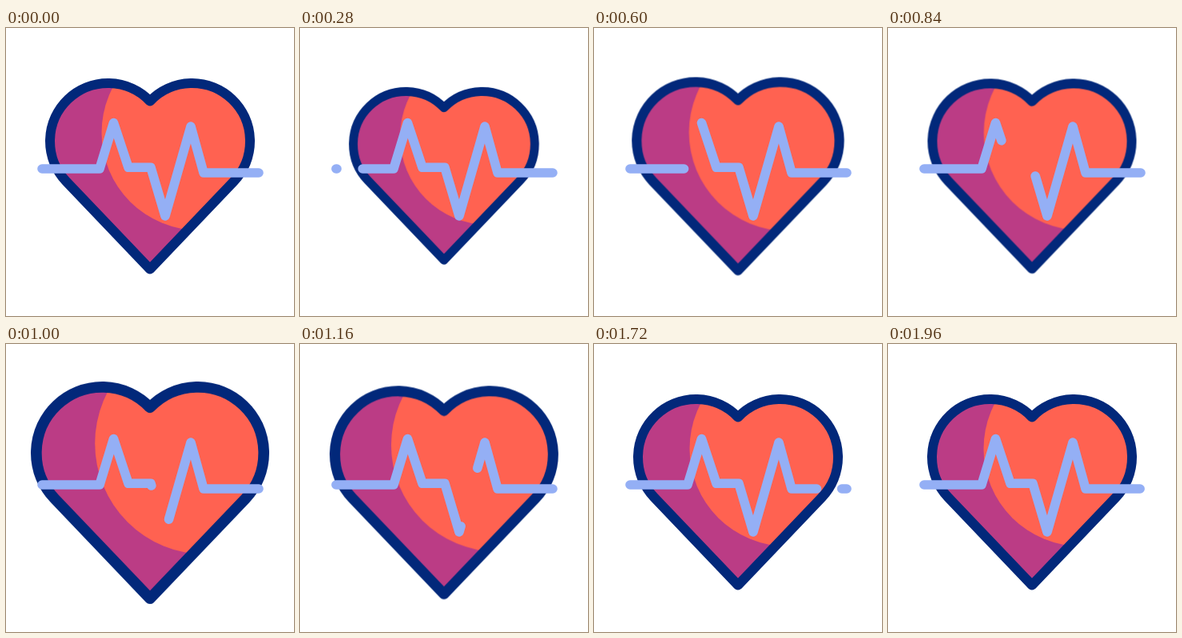
An HTML page that plays this animation: 360 by 360 pixels, repeating every 2 s.

```html
<!DOCTYPE html>
<html lang="en">
<head>
<meta charset="utf-8">
<title>Heartbeat</title>
<style>
  html, body { margin: 0; width: 100%; height: 100%; overflow: hidden; background: #fff; }
  svg { display: block; width: 100vw; height: 100vh; }
  #heart { transform-origin: 180px 180px; }
  .outline { fill: none; stroke: #02287a; stroke-width: 12; stroke-linejoin: round; }
  .pulse {
    fill: none; stroke: #94aff5; stroke-width: 11.6;
    stroke-linecap: round; stroke-linejoin: round; stroke-dasharray: 1 2;
  }
</style>
</head>
<body>
<svg viewBox="0 0 360 360">
  <defs>
    <path id="shape" d="M180 91.5A72.5 72.5 0 0 0 75 191.5L180 301.5L285 191.5A72.5 72.5 0 0 0 180 91.5Z"/>
    <clipPath id="inside"><use href="#shape"/></clipPath>
  </defs>
  <g id="heart">
    <use href="#shape" fill="#bb3c85"/>
    <g clip-path="url(#inside)"><circle cx="241.4" cy="131" r="121.9" fill="#ff6251"/></g>
    <use href="#shape" class="outline"/>
  </g>
  <path id="drawn" class="pulse" pathLength="1"/>
  <path id="erased" class="pulse" pathLength="1"/>
</svg>
<script>
  const byId = id => document.getElementById(id);
  const loop = { duration: 2000, iterations: Infinity };

  const trace = "M45 176H117L134.5 118.5L153 174.3H181L199 235L231 123L247 181H316";
  byId("drawn").setAttribute("d", trace);
  byId("erased").setAttribute("d", trace);

  // Beat: [time in ms, scale]
  const beat = [[0, 1], [250, .9], [500, 1.09], [715, .92], [1030, 1.142], [1350, 1], [2000, 1]];
  byId("heart").animate(beat.map(([ms, scale]) => ({
    offset: ms / 2000,
    transform: `scale(${scale})`,
    easing: "cubic-bezier(.37,0,.63,1)"
  })), loop);

  // A gap runs along the trace: one copy is erased from its start, the other redrawn behind it.
  function sweep(id, from, to, start, end, easing) {
    const key = (offset, value) => ({ offset, strokeDashoffset: String(value), easing });
    byId(id).animate([key(0, from), key(start / 2000, from), key(end / 2000, to), key(1, to)], loop);
  }
  sweep("erased", 0, -1, 0, 1840, "cubic-bezier(.333,0,.667,1)");
  sweep("drawn", 1, 0, 240, 2000, "cubic-bezier(.28,0,.69,1)");
</script>
</body>
</html>
```
